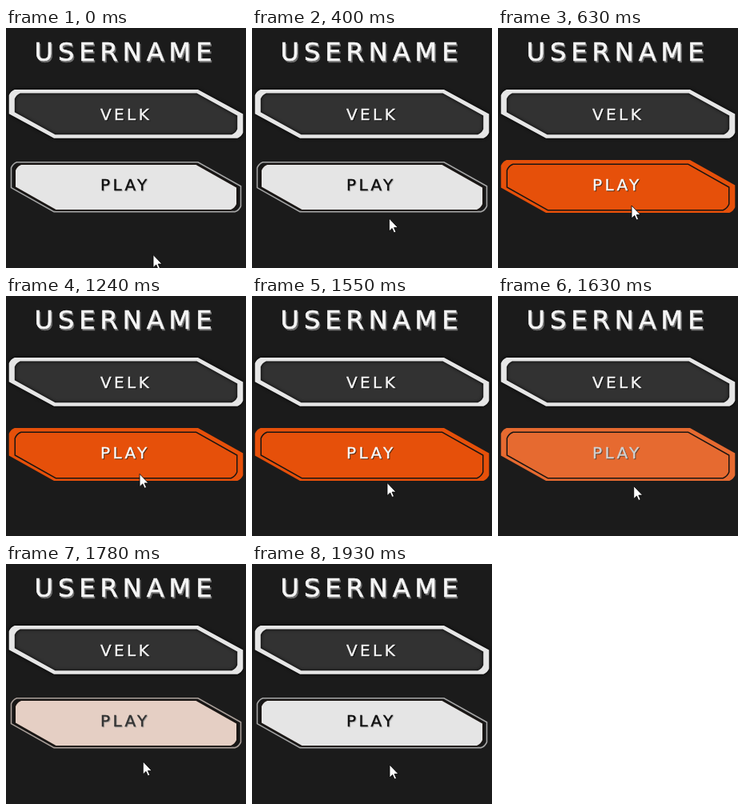
Write an HTML page with a canvas that moves like this. It is 300 px wide and 300 px high and loops after 2.01 s.

```html
<!DOCTYPE html>
<html lang="en">
<head>
<meta charset="utf-8">
<title>Login buttons</title>
<style>
html, body { margin: 0; width: 100%; height: 100%; overflow: hidden; background: #1b1b1b; }
canvas { display: block; }
</style>
</head>
<body>
<canvas id="stage" width="300" height="300"></canvas>
<script>
const ctx = document.getElementById('stage').getContext('2d');
const LOOP = 2010;
const STEP = LOOP / 26;
const BG = '#1b1b1b';
const LIGHT = [229, 229, 229];
const ORANGE = [230, 80, 10];

// Cursor stops
const AWAY = [183.5, 283];
const OVER = [166.5, 221.5];
const REST = [171.5, 250.5];

const lerp = (a, b, k) => a.map((v, i) => v + (b[i] - v) * k);
const mix = (a, b, k) => `rgb(${lerp(a, b, k).map(Math.round)})`;
const progress = (t, from, to) => Math.min(1, Math.max(0, (t - from) / (to - from)));
const smooth = u => u * u * (3 - 2 * u);

function cursorAt(t) {
  return t < 1200
    ? lerp(AWAY, OVER, 1 - (1 - progress(t, 0, 600)) ** 1.3)
    : lerp(OVER, REST, progress(t, 1200, 1840) ** 1.5);
}

const hoverAt = t => smooth(progress(t, 420, 540)) - smooth(progress(t, 1540, 1855));

// Plate with two large diagonal cuts, symmetric about its centre
function plate(left, top, bottom, cut, drop) {
  const right = 300 - left, c = 7, p = new Path2D();
  p.moveTo(left, top + c);
  p.quadraticCurveTo(left + 2, top + 2, left + c, top);
  p.lineTo(cut, top);
  p.lineTo(right, top + drop);
  p.lineTo(right, bottom - c);
  p.quadraticCurveTo(right - 2, bottom - 2, right - c, bottom);
  p.lineTo(300 - cut, bottom);
  p.lineTo(left, bottom - drop);
  p.closePath();
  return p;
}

const fieldOuter = plate(3.7, 77, 137.7, 240, 30.5);
const fieldInner = plate(10.8, 81.5, 133.3, 238.5, 28);
const fieldRing = new Path2D(fieldOuter);
fieldRing.addPath(fieldInner);
const frame = plate(3.7, 165, 231, 240, 31.5);
const outline = plate(6.5, 167.8, 229.6, 240, 30);
const face = plate(12, 171, 227, 237.5, 28.5);

function fill(path, color) {
  ctx.fillStyle = color;
  ctx.fill(path);
}

function stroke(path, color, width) {
  ctx.strokeStyle = color;
  ctx.lineWidth = width;
  ctx.stroke(path);
}

function label(text, x, y, size, gap, color, shade, offset) {
  ctx.font = `${size}px "DejaVu Sans", sans-serif`;
  ctx.letterSpacing = gap + 'px';
  ctx.lineWidth = size / 50;
  for (const [c, d] of [[shade, offset], [color, 0]]) {
    ctx.fillStyle = ctx.strokeStyle = c;
    ctx.fillText(text, x + d, y + d);
    ctx.strokeText(text, x + d, y + d);
  }
}

function drawField() {
  fill(fieldInner, '#323232');
  ctx.save();
  ctx.shadowColor = '#000';
  ctx.shadowBlur = 4;
  ctx.fillStyle = '#e6e6e6';
  ctx.fill(fieldRing, 'evenodd');
  ctx.restore();
  label('VELK', 118, 115, 20, 3.4, '#f4f4f4', '#111', 1);
}

function drawButton(hover) {
  const color = mix(LIGHT, ORANGE, hover);
  if (hover > .45) {
    fill(frame, color);
  } else {
    fill(outline, '#181818');
    stroke(outline, mix([165, 165, 165], ORANGE, hover * .5), 1.6);
  }
  stroke(face, '#1a1512', 3);
  fill(face, color);
  label('PLAY', 118, 203, 20, 3.4, mix([16, 16, 16], [250, 250, 250], hover),
    mix([180, 180, 180], [90, 45, 20], hover), 1);
}

function drawCursor(x, y) {
  ctx.save();
  ctx.translate(x, y);
  const arrow = new Path2D('M.5 .5V16.5L4.2 13L6.6 18.4L9 17.4L6.6 12H11.5Z');
  fill(arrow, '#fff');
  stroke(arrow, '#000', .8);
  ctx.restore();
}

function draw(now) {
  const t = Math.floor((now % LOOP) / STEP) * STEP;
  ctx.fillStyle = BG;
  ctx.fillRect(0, 0, 300, 300);
  label('USERNAME', 35.5, 41, 32, 6, '#f5f5f5', '#707070', 1.5);
  drawField();
  drawButton(hoverAt(t));
  drawCursor(...cursorAt(t));
}

const start = performance.now();
function tick() {
  draw(performance.now() - start);
  requestAnimationFrame(tick);
}
tick();
</script>
</body>
</html>
```
